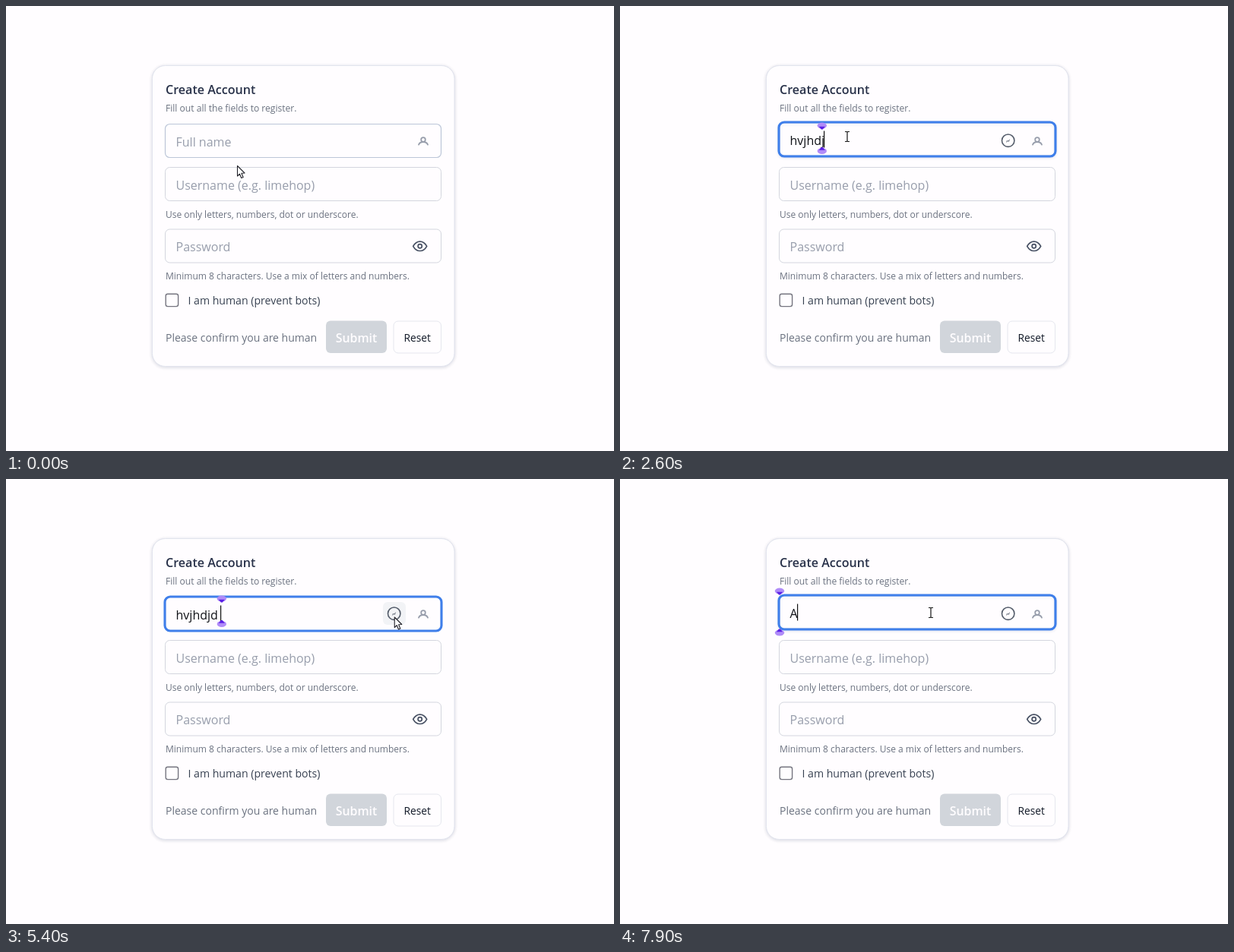
Write an HTML page with a canvas that moves like this. It is 800 px wide and 586 px high and loops after 8000 ms.

```html
<!DOCTYPE html>
<html lang="en">
<head>
<meta charset="utf-8">
<title>Create Account</title>
<style>
  html, body { margin: 0; width: 100%; height: 100%; overflow: hidden; background: #fffdff; }
  canvas { display: block; width: 800px; height: 586px; }
</style>
</head>
<body>
<canvas id="stage" width="800" height="586"></canvas>
<script>
const c = document.getElementById('stage').getContext('2d');
const LOOP = 8000, STEP = 100;
const FONT = '"Open Sans", "Noto Sans", sans-serif';
const BG = '#fffdff', GREY = '#6b7280', PALE = '#989eac', BLUE = '#3f7fea';
const TEXT_X = 223.5;

// Each keyframe is [time, ...values]; values blend with a smooth ease.
function at(keys, t) {
  let a = keys[0];
  for (const b of keys) {
    if (t < b[0]) {
      const p = Math.max(0, (t - a[0]) / (b[0] - a[0] || 1));
      const e = p * p * (3 - 2 * p);
      return a.slice(1).map((v, i) => v + (b[i + 1] - v) * e);
    }
    a = b;
  }
  return a.slice(1);
}

const mouse = [
  [0, 304.5, 210.5], [500, 299, 172], [3500, 299, 172], [3900, 353.5, 173],
  [4500, 510.5, 183.5], [5300, 510.5, 183.5], [5500, 512, 180.5],
  [6200, 512, 180.5], [6800, 409, 176]
];
const lift = [[100, 0], [400, 2], [4200, 2], [4400, 0], [5500, 0], [5700, 2]];
const ring = [[600, 0], [800, 1], [5400, 1], [5700, 0], [6800, 0], [7000, 1]];

const typed = 'hvjhdjd ';
const typeTimes = [1600, 1800, 2000, 2200, 2400, 2600, 2800, 3100];
const CLEAR = 5500, RETYPE = 7900;

function font(size, weight = 400) { c.font = `${weight} ${size}px ${FONT}`; }

function text(str, x, y, size, color, weight, align = 'left') {
  font(size, weight);
  c.fillStyle = color;
  c.textAlign = align;
  c.fillText(str, x, y);
}

function box(x, y, w, h, r, fill, stroke, line = 1) {
  c.beginPath();
  c.roundRect(x, y, w, h, r);
  if (fill) { c.fillStyle = fill; c.fill(); }
  if (stroke) { c.strokeStyle = stroke; c.lineWidth = line; c.stroke(); }
}

function shadow(color, blur, dy) {
  c.shadowColor = color;
  c.shadowBlur = blur;
  c.shadowOffsetY = dy;
}

function path(d, x, y, fill, stroke, line) {
  const p = new Path2D(d);
  c.save();
  c.translate(x, y);
  c.lineCap = c.lineJoin = 'round';
  if (fill) { c.fillStyle = fill; c.fill(p); }
  if (stroke) { c.strokeStyle = stroke; c.lineWidth = line; c.stroke(p); }
  c.restore();
}

function circle(x, y, r, stroke, line) {
  c.beginPath();
  c.arc(x, y, r, 0, 7);
  c.strokeStyle = stroke;
  c.lineWidth = line;
  c.stroke();
}

function valueAt(t) {
  if (t >= RETYPE) return 'A';
  if (t >= CLEAR) return '';
  return typed.slice(0, typeTimes.filter(k => k <= t).length);
}

function caretShown(t) {
  if (t < 700 || (t >= CLEAR && t < 6900)) return false;
  const since = [700, ...typeTimes, 6900, RETYPE].filter(k => k <= t).pop();
  return (t - since) % 1060 < 530;
}

function textEnd(str) {
  font(16);
  return TEXT_X + c.measureText(str).width;
}

function handleKeys() {
  const keys = [[800, 210, 148, 202]];
  let last = keys[0].slice(1);
  typeTimes.forEach((k, i) => {
    const next = [textEnd(typed.slice(0, i + 1)) + 0.8, 158, 190.5];
    keys.push([k, ...last], [k + 100, ...last], [k + 200, ...next]);
    last = next;
  });
  keys.push([CLEAR, ...last], [CLEAR + 200, 210, 148, 202]);
  return keys;
}

function handle(x, y, dir) {
  c.fillStyle = '#b08cf8';
  c.beginPath();
  c.ellipse(x, y - dir * 0.5, 6.2, 4, 0, 0, 7);
  c.fill();
  path(`M-4 ${dir * 0.8} H4 L1 ${dir * 4.6} H-1 Z`, x, y, '#5b21e6');
}

function card() {
  c.save();
  shadow('rgba(30,41,80,.16)', 4, 1);
  box(192.5, 78.5, 397.5, 396, 17, BG, '#e2e4ee');
  c.restore();
  box(192.5, 78.5, 397.5, 396, 17, BG, '#e2e4ee');

  text('Create Account', 210, 115.5, 16.1, '#283149', 600);
  text('Fill out all the fields to register.', 210, 139.3, 12.1, GREY);

  box(209.5, 212.5, 363, 44, 6, BG, '#d3d6de');
  text('Username (e.g. limehop)', TEXT_X, 241.5, 16, PALE);
  text('Use only letters, numbers, dot or underscore.', 210, 278.5, 12, GREY);

  box(209.5, 294, 363, 44, 6, BG, '#d3d6de');
  text('Password', TEXT_X, 323, 16, PALE);
  path('M-9 0 Q-5.5 -6.2 0 -6.2 Q5.5 -6.2 9 0 Q5.5 6.2 0 6.2 Q-5.5 6.2 -9 0 Z',
    544.7, 316.3, null, '#475063', 1.7);
  circle(544.7, 316.3, 2.6, '#475063', 1.7);
  text('Minimum 8 characters. Use a mix of letters and numbers.', 210, 360, 12, GREY);

  box(210.2, 379.2, 16.4, 16.4, 2.5, BG, '#767680', 1.4);
  text('I am human (prevent bots)', 239.5, 393.3, 14.1, '#374151');
  text('Please confirm you are human', 210, 442.3, 14, GREY);

  box(421, 414.5, 80, 42.5, 6, '#d1d5db');
  text('Submit', 461, 442.8, 15.9, '#fffdff', 600, 'center');
  box(510, 415, 62.5, 42, 6, BG, '#e5e7ee');
  text('Reset', 541.2, 442.2, 13.8, '#111827', 400, 'center');
}

function nameField(t, value, dy) {
  const top = 155.5 - dy, [focus] = at(ring, t);
  c.save();
  if (dy) shadow(`rgba(40,70,130,${0.08 * dy})`, 4, 1.5);
  box(209.5, top, 363, 44, 6, BG, dy ? '#b4c2d8' : '#bcc6d8', 1.2);
  c.restore();
  c.globalAlpha = dy / 2;
  box(209.5, top, 363, 44, 6, null, '#7ba4dc', 1.3);
  c.globalAlpha = focus;
  box(209, top - 0.5, 364, 45, 7, null, BLUE, 3.1);
  c.globalAlpha = 1;

  const base = 184.5 - dy;
  text(value || 'Full name', TEXT_X, base, 16, value ? '#111318' : PALE);
  if (caretShown(t)) {
    c.fillStyle = '#111';
    c.fillRect(Math.floor(textEnd(value) - 0.4), base - 18, 1.2, 22);
  }
}

function nameIcons(value, overClear) {
  if (value) {
    if (overClear) box(496, 162, 30, 30, 6, '#f2f3f6');
    circle(510.7, 177.2, 8.2, '#555d6b', 1.6);
    path('M-2.5 2.5 L2.5 -2.5 L0.8 1.6 L-1.6 -0.6 Z', 510.7, 177.4, '#555d6b');
  }
  circle(549, 176, 2.8, PALE, 1.8);
  path('M-6 4.6 Q-4.5 1 0 1 Q4.5 1 6 4.6', 549, 178, null, PALE, 1.8);
}

function pointer(t, x, y) {
  const beam = (t >= 300 && t < 4300) || t >= CLEAR;
  if (beam) {
    path('M-2.5 -6.5 H-1 L0 -6 L1 -6.5 H2.5 M0 -6 V6 M-2.5 6.5 H-1 L0 6 L1 6.5 H2.5',
      x, y, null, '#151515', 1.2);
  } else {
    path('M0 0 V13.5 L3 10.7 L5.2 16 L7.6 15 L5.4 9.8 L9.5 9.5 Z',
      x, y, '#fff', '#22222a', 1.1);
  }
}

function draw(t) {
  c.fillStyle = BG;
  c.fillRect(0, 0, 800, 586);
  const value = valueAt(t), [mx, my] = at(mouse, t), [dy] = at(lift, t);
  card();
  nameField(t, value, dy);
  nameIcons(value, mx > 496 && mx < 526);
  if (t >= 800) {
    const [x, upper, lower] = at(handleKeys(), t);
    handle(x, upper, 1);
    handle(x, lower, -1);
  }
  pointer(t, mx, my);
}

const start = performance.now();
function tick() {
  const t = (performance.now() - start) % LOOP;
  draw(Math.floor(t / STEP) * STEP);
  requestAnimationFrame(tick);
}
tick();
</script>
</body>
</html>
```
